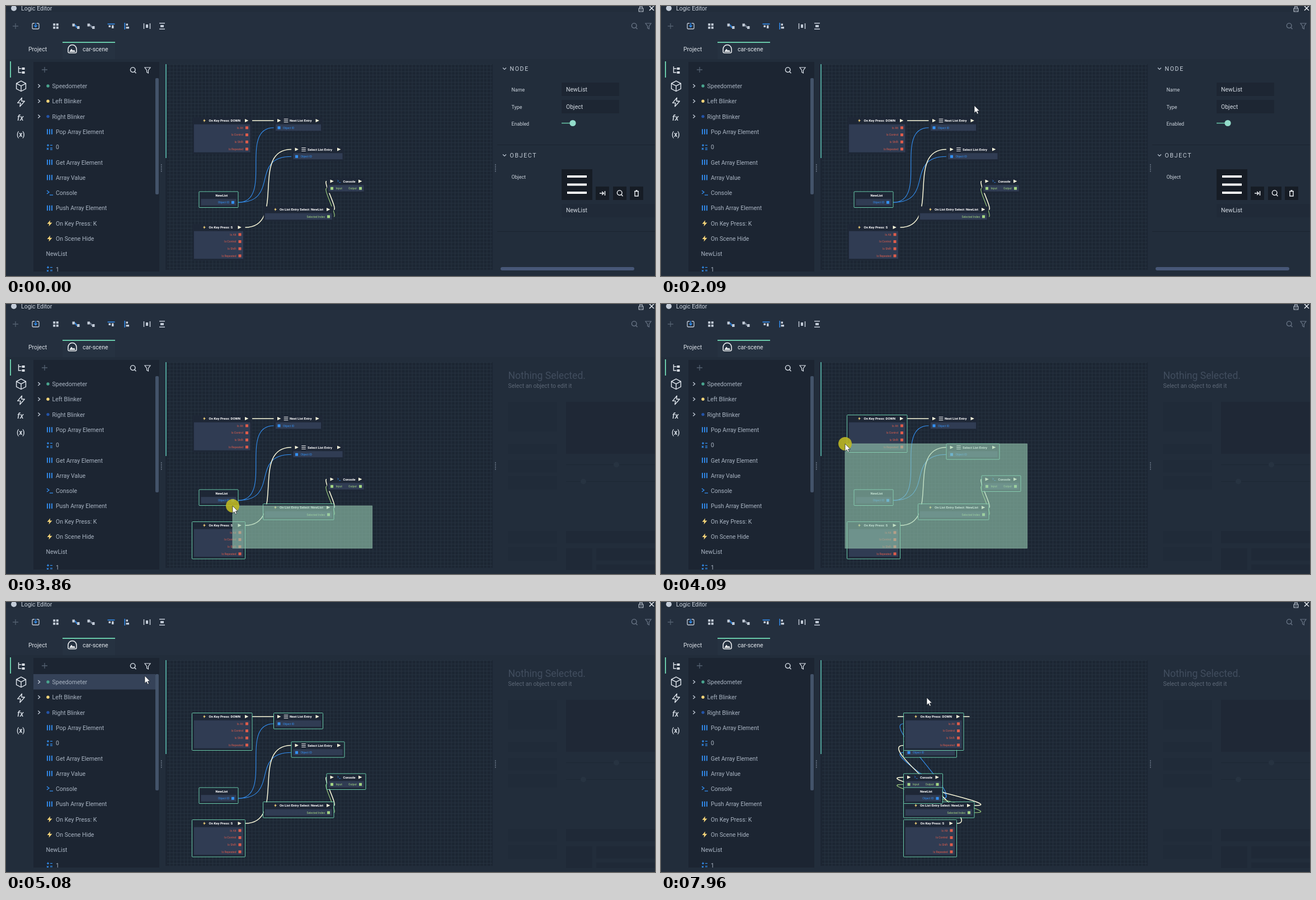
Write an HTML page that moves like this. It is 1160x483 px and loops after 8 s.

```html
<!DOCTYPE html>
<html lang="en">
<head>
<meta charset="utf-8">
<title>Logic Editor</title>
<style>
html, body { margin: 0; width: 100%; height: 100%; overflow: hidden; background: #222d3b; }
svg { display: block; width: 1160px; height: 483px; font-family: Roboto, "Open Sans", sans-serif; }
text { white-space: pre; }
</style>
</head>
<body>
<svg id="stage" viewBox="0 0 1160 483"></svg>
<script>
const LOOP = 8000;
const DRAG_START = 3630, DRAG_END = 4550, PRESS = 6170, RELEASE = 6400;
const TEAL = '#69c9a9', BLUE = '#3391f5', RED = '#dd5c4b', GREEN = '#a3d583', CREAM = '#fdfbdc', ICON = '#c3ccd8';
const DIM = '#536070', YELLOW = '#f4d479';

const rect = (x, y, w, h, fill, extra = '') =>
  `<rect x="${x}" y="${y}" width="${w}" height="${h}" fill="${fill}" ${extra}/>`;
const line = (d, color, w = 1.2, extra = '') =>
  `<path d="${d}" fill="none" stroke="${color}" stroke-width="${w}" ${extra}/>`;
const shape = (d, fill) => `<path d="${d}" fill="${fill}"/>`;
const dot = (x, y, r, fill) => `<circle cx="${x}" cy="${y}" r="${r}" fill="${fill}"/>`;
const label = (x, y, s, size = 10.5, fill = '#a9b4c2', extra = '') =>
  `<text x="${x}" y="${y}" font-size="${size}" fill="${fill}" ${extra}>${s}</text>`;
const at = (x, y, body, scale = 1) => `<g transform="translate(${x} ${y}) scale(${scale})">${body}</g>`;

// Icons are centred on 0,0.
const BOLT = 'M1-5.5L-4.5 1H-.8L-1.5 5.5L4.5-1.3H.6Z';
const icons = {
  plus: c => line('M-5 0H5M0-5V5', c, 1.3),
  search: c => line('M4-.8A4.3 4.3 0 1 1-4.6-.8A4.3 4.3 0 0 1 4-.8M2.8 2.6L5.5 5.3', c, 1.4),
  funnel: c => line('M-5-5H5L1.4 0V5L-1.4 3.4V0Z', c, 1.2),
  bolt: c => shape(BOLT, c),
  events: c => line(BOLT, c, 1, 'stroke-linejoin="round"'),
  array: c => [-4.9, -.9, 3.1].map(x => rect(x, -4.7, 1.8, 9.4, c)).join(''),
  math: c => line('M-5-3H-1M-3-5V-1M1-3H5M-5 1.8L-2 4.8M-2 1.8L-5 4.8M1 2H5M1 4.6H5', c, 1.3),
  prompt: c => line('M-5-4L-1-1L-5 2M0 4H6', c, 1.3),
  list: c => line('M-4-3H4M-4 0H4M-4 3H4', c, 1),
  play: c => shape('M-3-3.1L3.4 0L-3 3.1Z', c),
  chevron: c => line('M-1.7-3L1.7 0L-1.7 3', c, 1.3),
  open: c => line('M-3-1.5L0 1.5L3-1.5', c, 1.1),
  close: c => line('M-4-4L4 4M4-4L-4 4', c, 1.5),
  lock: c => line('M-3.7-1H3.7V5H-3.7ZM-2-1V-3.2A2 2 0 0 1 2-3.2V-1M0 1V3', c, 1.2),
  save: c => line('M-2-5H-4.5Q-6-5-6-3V3Q-6 5-4 5H4Q6 5 6 3V-3Q6-5 4.5-5H2', ICON, 1.3) + line('M0-6V1M-2.6-1.2L0 1.6L2.6-1.2', c, 1.4),
  tiles: c => [-4.8, .8].map(x => [-4.8, .8].map(y => rect(x, y, 4, 4, c)).join('')).join(''),
  link: c => rect(-6.5, -4.5, 4.5, 5, ICON) + rect(2, 0, 4.5, 5, ICON) + line('M-2.5-2Q0-2 0 0T2.5 2.5', c, 1.6),
  alignTop: c => rect(-6.5, -4.5, 13, 1.5, c) + rect(-4.5, -1.5, 3.5, 3.5, ICON) + rect(1, -1.5, 3.5, 5.5, ICON),
  alignLeft: c => rect(-4.5, -6, 1.5, 12, c) + rect(-1.5, -4.5, 3.5, 3.5, ICON) + rect(-1.5, 1, 5.5, 3.5, ICON),
  spreadX: c => line('M-5.5-5V5M5.5-5V5', c, 1.5) + rect(-2, -3, 4, 6, c),
  spreadY: c => line('M-5-5.3H5M-5 5.3H5', c, 1.5) + rect(-3, -2, 6, 4, c),
  tree: c => line('M-5-6V5H0M-5-2H0', c, 1.4) + rect(1, -4, 5, 4, c) + rect(1, 3, 5, 4, c),
  cube: c => line('M0-8L7.5-4V4.5L0 8.5L-7.5 4.5V-4ZM-7.5-4L0 0L7.5-4M0 0V8.5', c, 1.3),
  scene: c => line('M-7.5 5V0A7.5 7.5 0 0 1 7.5 0V5Q7.5 6.7 6 6.7H-6Q-7.5 6.7-7.5 5Z', c, 1.5) + shape('M-5.5 5L-1.5-.5L1.3 3L3 1.5L5.7 5Z', c),
  jump: c => line('M-5 0H2M-.7-3L2.3 0L-.7 3M4.5-4V4', c, 1.5),
  trash: c => line('M-4-3.5H4M-1.5-5H1.5M-3-3V5H3V-3', c, 1.4)
};
const icon = (name, x, y, color = ICON, scale = 1) => at(x, y, icons[name](color), scale);

function topBars() {
  const tools = [['plus', 17, DIM], ['save', 53, BLUE], ['tiles', 89, ICON], ['link', 125, BLUE], ['link', 152, '#8e9bad'],
    ['alignTop', 188, BLUE], ['alignLeft', 216, BLUE], ['spreadX', 252, ICON], ['spreadY', 279, ICON],
    ['search', 1123, '#687485'], ['funnel', 1148, '#687485']];
  return dot(14, 4, 5, ICON) + label(27, 8, 'Logic Editor', 10.5, '#ccd4de') +
    icon('lock', 1135, 5) + icon('close', 1154, 4, '#e8edf2') +
    rect(203, 23, 26, 29, '#354258', 'id="buttonHover" rx="2"') +
    tools.map(([n, x, c]) => icon(n, x, 36, c)).join('') +
    label(40, 81, 'Project', 10.5, '#dce2e9') +
    rect(101, 64, 94, 31, '#263241') + rect(101, 64, 94, 2, TEAL) +
    icon('scene', 118.5, 77, '#f2f5f7') + label(137, 81, 'car-scene', 10.5, '#e4e9ee');
}

const rows = [['dot', 'Speedometer', '#4aa58f'], ['dot', 'Left Blinker', YELLOW], ['dot', 'Right Blinker', '#2453a6'],
  ['array', 'Pop Array Element'], ['math', '0'], ['array', 'Get Array Element'], ['array', 'Array Value'],
  ['prompt', 'Console'], ['array', 'Push Array Element'], ['bolt', 'On Key Press: K', YELLOW],
  ['bolt', 'On Scene Hide', YELLOW], ['', 'NewList'], ['math', '1']];
const rowY = i => 143 + i * 27.3;

function sidebar() {
  const list = rows.map(([kind, name, color = BLUE], i) => {
    const y = rowY(i);
    if (kind === 'dot') return icon('chevron', 59, y, ICON) + dot(75, y, 2.7, color) + label(82.5, y + 4, name);
    return (kind ? icon(kind, 78, y, color) : '') + label(kind ? 89 : 71.5, y + 4, name);
  }).join('');
  return rect(7, 99, 2, 29, TEAL) + icon('tree', 27.5, 114, '#dfe5ec') + icon('cube', 27, 143, '#dfe5ec', 1.12) +
    icon('events', 27, 172, '#dfe5ec', 1.4) + label(20, 205, 'fx', 14, '#d5dce4', 'font-style="italic" font-weight="500"') +
    label(19, 233.5, '(x)', 12, '#d5dce4', 'font-weight="700"') +
    rect(49, 100, 225, 375, '#1c2532') + icon('plus', 69, 114, DIM) +
    icon('search', 227, 115, '#dbe2ea') + icon('funnel', 253, 115, '#dbe2ea') +
    '<clipPath id="listClip"><rect x="49" y="129" width="225" height="346"/></clipPath>' +
    `<g clip-path="url(#listClip)">${rect(49, 129, 218, 27.5, '#354258', 'id="rowHover"')}${list}</g>` +
    rect(267, 129, 6, 208, '#43536a', 'rx="2"') + grip(278) + grip(875);
}
const grip = x => [0, 1, 2, 3, 4].map(i => rect(x - 1, 283 + i * 3, 1.5, 1.5, '#7c899a')).join('');

const field = (y, name, value) => label(903.5, y + 3.5, name, 8.9, '#ccd4dd') +
  (value ? rect(993, y - 12, 103, 24, '#1d2633') + label(1001, y + 4, value, 10.5, '#d4dbe3') : '');
const section = (y, name) => icon('open', 891, y) + label(900.5, y + 4, name, 10.5, '#c8d0da', 'letter-spacing="1.7"');

function inspector() {
  const tools = [['jump', 1066], ['search', 1097], ['trash', 1127]];
  return '<g id="inspector">' + section(112, 'NODE') + field(149, 'Name', 'NewList') + field(180, 'Type', 'Object') +
    field(210, 'Enabled') + rect(993, 208.8, 16, 1.5, TEAL) + dot(1013, 209.5, 5.6, '#93dcca') +
    rect(878, 248, 282, 1, '#1b2430') + section(267, 'OBJECT') + field(305, 'Object') +
    rect(993, 292, 55, 55, '#161c25') + [303, 317.5, 332].map(y => rect(1003, y, 35, 4, '#fff')).join('') +
    tools.map(([n, x]) => rect(x - 12, 323, 24, 24, '#161c25') + icon(n, x, 335, '#eef1f5')).join('') +
    rect(993, 354, 167, 24, '#202a38') + label(1001, 369, 'NewList', 10.5, '#d4dbe3') +
    rect(878, 403, 282, 1, '#1b2430') + rect(884, 467, 239, 6, '#475777', 'rx="3"') + '</g>';
}

function emptyPanel() {
  const left = [[175, 53], [250, 18], [279, 22], [308, 24], [406, 22], [435, 25]];
  const right = [[1001, 406, 159, 22], [1001, 437, 47, 39], [1055, 437, 105, 22], [1055, 466, 105, 10]];
  return '<g id="emptyPanel">' + label(897.5, 134, 'Nothing Selected.', 17.6, '#414d5e') +
    label(897.5, 150, 'Select an object to edit it', 10.4, '#5c6776') +
    left.map(([y, h]) => rect(897, y, 88, h, '#202b39')).join('') +
    rect(1001, 175, 159, 93, '#1f2836') + right.map(r => rect(...r, '#1f2937')).join('') +
    rect(1001, 287, 159, 1, '#1d2734') + rect(1001, 317, 159, 1, '#1d2734') +
    dot(1091, 287.5, 5, '#273341') + dot(1032, 317.5, 5, '#273341') + '</g>';
}

// Back to front; every node is later aligned to ALIGN_X.
const ALIGN_X = 433.5;
const keyPorts = ['Is Alt', 'Is Control', 'Is Shift', 'Is Repeated'];
const nodes = {
  next: { x: 478.5, y: 198.5, w: 88, h: 28.5, title: 'Next List Entry', icon: 'list', tx: 28.5, flow: 'io', inputs: ['Object ID'], color: BLUE },
  select: { x: 510, y: 250, w: 95, h: 28, title: 'Select List Entry', icon: 'list', tx: 29, flow: 'io', inputs: ['Object ID'], color: BLUE },
  down: { x: 332.5, y: 198.5, w: 107.5, h: 67, title: 'On Key Press: DOWN', icon: 'bolt', tx: 30, flow: 'o', outputs: keyPorts, color: RED },
  console: { x: 573, y: 307, w: 70, h: 28.5, title: 'Console', icon: 'prompt', tx: 29.5, flow: 'io', inputs: ['Input'], outputs: ['Output'], color: GREEN },
  entry: { x: 459.5, y: 357.5, w: 126.5, h: 28.5, title: 'On List Entry Select: NewList', icon: 'bolt', tx: 29.5, flow: 'o', outputs: ['Selected Index'], color: GREEN },
  list: { x: 345, y: 332, w: 70, h: 28.5, title: 'NewList', tx: 29.5, flow: '', outputs: ['Object ID'], color: BLUE },
  keyS: { x: 332.5, y: 389.5, w: 95, h: 66.5, title: 'On Key Press: S', icon: 'bolt', tx: 30, flow: 'o', outputs: keyPorts, color: RED }
};
const wires = [['down', 0, 'next', 0, CREAM], ['list', 1, 'next', 1, BLUE], ['list', 1, 'select', 1, BLUE],
  ['keyS', 0, 'select', 0, CREAM], ['entry', 1, 'console', 1, GREEN], ['entry', 0, 'console', 0, CREAM]];
const portY = i => i * 12.7 + 6.6;

function drawNode([id, n]) {
  const port = (name, i, out) => {
    const y = portY(i + 1);
    return rect(out ? n.w - 12 : 7, y - 2.5, 5, 5, n.color) +
      label(out ? n.w - 16 : 16.5, y + 1.9, name, 5, n.color, out ? 'text-anchor="end"' : '');
  };
  const iconColor = n.icon === 'bolt' ? YELLOW : n.icon === 'prompt' ? BLUE : '#fff';
  return `<g id="${id}">` + rect(1, 1, n.w - 2, n.h - 2, '#1e2736', 'rx="1"') +
    rect(3.5, 13.2, n.w - 7, n.h - 17, '#303c53') +
    (n.flow.includes('i') ? icon('play', 9.5, 6.5, CREAM) : '') +
    (n.flow.includes('o') ? icon('play', n.w - 10, 6.5, CREAM) : '') +
    (n.icon ? icon(n.icon, 22, 6.5, iconColor, n.icon === 'list' ? .95 : .55) : '') +
    label(n.tx, 8.8, n.title, 6, '#fff', 'font-weight="700"') +
    (n.inputs || []).map((s, i) => port(s, i, false)).join('') +
    (n.outputs || []).map((s, i) => port(s, i, true)).join('') +
    rect(0, 0, n.w, n.h, 'none', `class="outline" stroke="${TEAL}" rx="1"`) + '</g>';
}

function graph() {
  return `<pattern id="grid" x="286" y="104" width="6.37" height="6.37" patternUnits="userSpaceOnUse">
    <path d="M.5 0V6.37M0 .5H6.37" stroke="#273341" stroke-width=".8"/></pattern>` +
    rect(285, 104, 585, 368, '#1c2633') + rect(288, 104, 581, 368, 'url(#grid)') +
    rect(285, 104, 2, 168, '#4f9f97') +
    wires.map(w => line('', w[4], w[4] === CREAM ? 1.5 : 1.1, 'class="wire"')).join('') +
    Object.entries(nodes).map(drawNode).join('');
}

const stage = document.getElementById('stage');
stage.innerHTML = rect(0, 0, 1160, 483, '#222d3b') + rect(0, 11, 1160, 84, '#242f3e') + topBars() + sidebar() +
  graph() + inspector() + emptyPanel() +
  rect(0, 0, 0, 0, 'rgba(152,203,178,.6)', 'id="band" stroke="#86ad9d" stroke-width=".7"') +
  '<circle id="press" r="12" fill="#bdb724" fill-opacity=".9"/>' +
  '<path id="cursor" d="M0 0V13.4L3.1 10.6L5.2 15.2L7.4 14.2L5.4 9.8H9.4Z" fill="#fff" stroke="#111821" stroke-width=".7"/>';

const el = id => document.getElementById(id);
const show = (node, on) => node.setAttribute('visibility', on ? 'visible' : 'hidden');
const outlines = Object.keys(nodes).map(id => [id, nodes[id], stage.querySelector(`#${id} .outline`)]);
const wireEls = stage.querySelectorAll('.wire');

// Pointer stops [ms, x, y]; the pointer advances in ticks [from, step].
const ticks = [[0, 290], [290, 75], [840, 77.5], [3630, 76], [4940, 70], [7870, 90]];
const stops = [[290, 932, 425], [365, 850, 385], [440, 792, 363], [763, 792, 363], [920, 690, 255], [1072, 600, 198],
  [1227, 630, 280], [1305, 570, 345], [1382, 480, 374], [1460, 416, 370], [1615, 396, 341], [1770, 333, 260],
  [1925, 420, 180], [2080, 560, 178], [2235, 651, 240], [2390, 625, 320], [2467, 570, 341], [2622, 485, 364],
  [2700, 450, 379], [2855, 363, 400], [3010, 420, 430], [3165, 540, 431], [3320, 649, 433], [3397, 654, 437],
  [3630, 654, 437], [3706, 590, 425], [3782, 490, 396], [3858, 405, 361], [4010, 345, 285], [4162, 313, 215],
  [4314, 306, 192], [4466, 305, 190], [4870, 305, 190], [5080, 248, 132], [5290, 236, 90], [5500, 225, 56],
  [5710, 217, 41], [5850, 216, 40], [7780, 216, 40], [7870, 350, 105], [7960, 475, 171]];

function pointerAt(t) {
  const [from, step] = ticks.findLast(k => k[0] <= t);
  const q = from + Math.floor((t - from) / step + 1e-6) * step;
  const i = stops.findIndex(s => s[0] > q);
  if (i <= 0) return (i ? stops.at(-1) : stops[0]).slice(1);
  const a = stops[i - 1], b = stops[i], k = (q - a[0]) / (b[0] - a[0]);
  return [a[1] + (b[1] - a[1]) * k, a[2] + (b[2] - a[2]) * k];
}

// Wires that run backwards bow out less than those running forwards.
function wirePath([from, i, to, j], aligned) {
  const a = nodes[from], b = nodes[to];
  const x1 = (aligned ? ALIGN_X : a.x) + a.w, x2 = aligned ? ALIGN_X : b.x;
  const y1 = a.y + portY(i), y2 = b.y + portY(j), dx = x2 - x1;
  const d = dx > 0 ? Math.min(75, dx) : -dx * .55;
  return `M${x1} ${y1}C${x1 + d} ${y1} ${x2 - d} ${y2} ${x2} ${y2}`;
}

let wasAligned = null;
function layout(aligned) {
  if (aligned === wasAligned) return;
  wasAligned = aligned;
  for (const [id, n] of outlines) el(id).setAttribute('transform', `translate(${aligned ? ALIGN_X : n.x} ${n.y})`);
  wireEls.forEach((w, i) => w.setAttribute('d', wirePath(wires[i], aligned)));
}

function render(t) {
  const [x, y] = pointerAt(t);
  const dragging = t >= DRAG_START && t < DRAG_END;
  const right = 654.5, bottom = 437;
  layout(t >= RELEASE);
  show(el('cursor'), t >= 290);
  el('cursor').setAttribute('transform', `translate(${x} ${y})`);
  show(el('press'), dragging || (t >= PRESS && t < RELEASE));
  el('press').setAttribute('cx', x);
  el('press').setAttribute('cy', y);
  show(el('band'), dragging);
  if (dragging) {
    const box = { x, y, width: Math.max(0, right - x), height: Math.max(0, bottom - y) };
    for (const k in box) el('band').setAttribute(k, box[k]);
  }
  for (const [id, n, outline] of outlines) {
    const inBand = n.x + n.w >= x && n.x < right && n.y + n.h >= y - 2 && n.y < bottom;
    show(outline, t < DRAG_START ? id === 'list' : t >= DRAG_END || inBand);
  }
  show(el('inspector'), t < DRAG_START);
  show(el('emptyPanel'), t >= DRAG_START);
  const row = Math.floor((y - 129) / 27.3);
  show(el('rowHover'), t > DRAG_END && t < PRESS && x < 267 && row >= 0);
  if (row >= 0) el('rowHover').setAttribute('y', 129 + row * 27.3);
  show(el('buttonHover'), x >= 203 && x <= 229 && y >= 23 && y <= 50);
}

const start = performance.now();
function frame() {
  render((performance.now() - start) % LOOP);
  requestAnimationFrame(frame);
}
frame();
</script>
</body>
</html>
```
